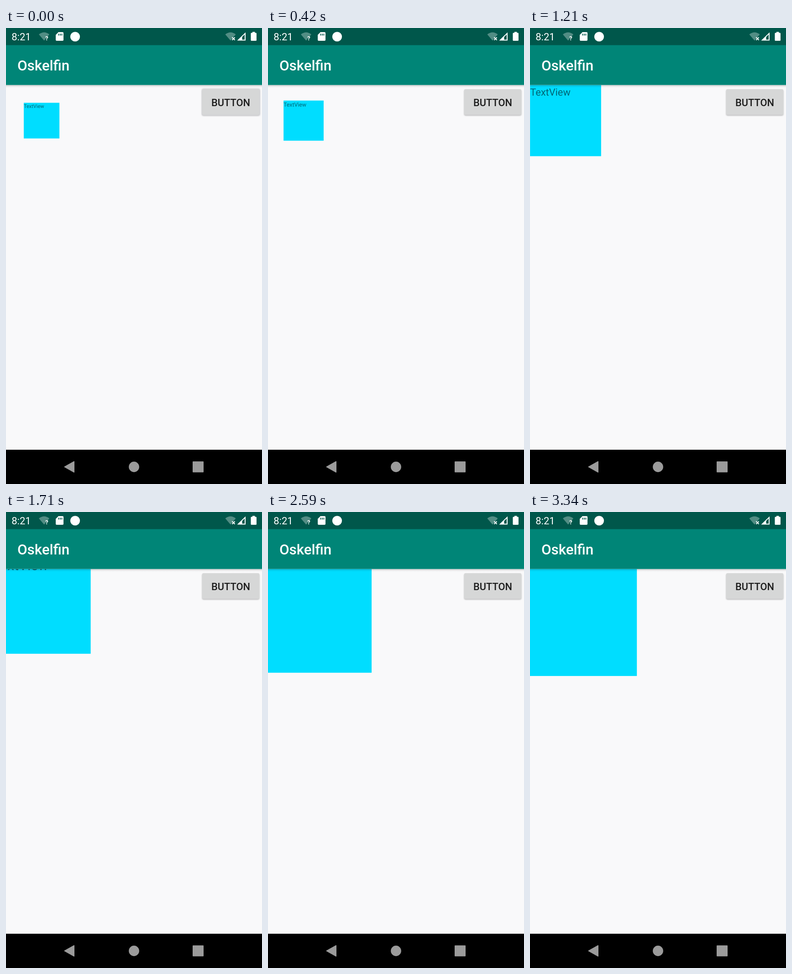
Write an HTML page that moves like this. It is 561 by 998 pixels and loops after 3.39 s.

```html
<!DOCTYPE html>
<html lang="en">
<head>
<meta charset="utf-8">
<title>Scaling view</title>
<style>
  html, body { margin: 0; width: 100%; height: 100%; overflow: hidden; background: #f9f9fa; }
  svg { display: block; width: 100%; height: 100%; font-family: Roboto, sans-serif; }
  .medium { font-weight: 500; }
</style>
</head>
<body>
<svg viewBox="0 0 561 998">
  <defs>
    <linearGradient id="shade" x2="0" y2="1">
      <stop offset="0" stop-color="#000" stop-opacity=".22"/>
      <stop offset=".45" stop-color="#000" stop-opacity=".07"/>
      <stop offset="1" stop-color="#000" stop-opacity="0"/>
    </linearGradient>
    <filter id="soft" x="-20%" y="-30%" width="140%" height="160%"><feGaussianBlur stdDeviation="1.5"/></filter>
    <clipPath id="content"><rect y="124.7" width="561" height="798.3"/></clipPath>
    <path id="wifi" d="M0 4.5Q11.5-4.5 23 4.5L11.5 18Z" fill="#fff" fill-opacity=".32"/>
  </defs>

  <rect width="561" height="998" fill="#f9f9fa"/>

  <g clip-path="url(#content)">
    <g id="view">
      <rect x="-78.1" y="-78.1" width="156.2" height="156.2" fill="#00ddff"/>
      <text x="-78.1" y="-55" font-size="21.9" fill="#000" fill-opacity=".54" text-rendering="geometricPrecision">TextView</text>
    </g>
    <rect x="430" y="135.5" width="125" height="56" rx="3" fill-opacity=".3" filter="url(#soft)"/>
    <rect id="press" x="429" y="132.5" width="128" height="59.5" rx="4" fill="#cfcfd2" filter="url(#soft)"/>
    <rect x="430" y="134" width="125" height="56.3" rx="3" fill="#d6d7d7"/>
    <text class="medium" x="492.5" y="170.8" font-size="21.9" text-anchor="middle" fill-opacity=".87">BUTTON</text>
    <rect y="124.7" width="561" height="6" fill="url(#shade)"/>
  </g>

  <rect width="561" height="124.7" fill="#008577"/>
  <rect width="561" height="37.5" fill="#00574b"/>
  <text class="medium" x="25" y="93" font-size="31.3" fill="#fff">Oskelfin</text>

  <g fill="#fff">
    <text x="12.3" y="27.4" font-size="21.9">8:21</text>
    <use href="#wifi" x="72" y="9.5"/>
    <text x="86" y="27" font-size="13.5" font-weight="700">?</text>
    <path fill-rule="evenodd" d="M115 9H124Q126 9 126 11V26Q126 28 124 28H111Q109 28 109 26V15ZM114.5 12.5V16.5H116.3V12.5ZM118 12.5V16.5H119.8V12.5ZM121.5 12.5V16.5H123.3V12.5Z"/>
    <circle cx="151.5" cy="19" r="10.6"/>
    <use href="#wifi" x="480.5" y="9.5"/>
    <path d="M495.5 20.5l6 6m0-6l-6 6" stroke="#fff" stroke-width="2"/>
    <path fill-rule="evenodd" d="M525 9.5V27.5H506.5ZM523 14.3L517.5 19.5V25.5H523Z"/>
    <path d="M540 8.5H545.5V10.5H547.5Q549 10.5 549 12V26.5Q549 28 547.5 28H538Q536.5 28 536.5 26.5V12Q536.5 10.5 538 10.5H540Z"/>
  </g>

  <rect y="923" width="561" height="75" fill="#000"/>
  <g fill="#9b9b9b" stroke="#9b9b9b" stroke-width="2" stroke-linejoin="round">
    <path d="M128.5 960.5L149 949V972Z"/>
    <circle cx="280.5" cy="960.5" r="10.4"/>
    <rect x="410" y="949.5" width="22" height="22"/>
  </g>
</svg>
<script>
  const LOOP = 3390, STEP = 1000 / 24;
  const DELAY = 18, DURATION = 3050;
  const view = document.getElementById('view');
  const press = document.getElementById('press');
  const clamp = v => Math.min(1, Math.max(0, v));
  const easeInOut = u => (1 - Math.cos(Math.PI * u)) / 2;

  function render(ms) {
    // Motion advances at 24 steps per second
    const t = Math.floor((ms % LOOP + 2) / STEP) * STEP;
    const scale = 0.5 + 1.5 * easeInOut(clamp((t - DELAY) / DURATION));
    view.setAttribute('transform', `translate(78 202.7) scale(${scale})`);
    press.setAttribute('opacity', clamp(1 - t / 250));
  }

  const start = performance.now();
  function tick() {
    render(performance.now() - start);
    requestAnimationFrame(tick);
  }
  tick();
</script>
</body>
</html>
```
